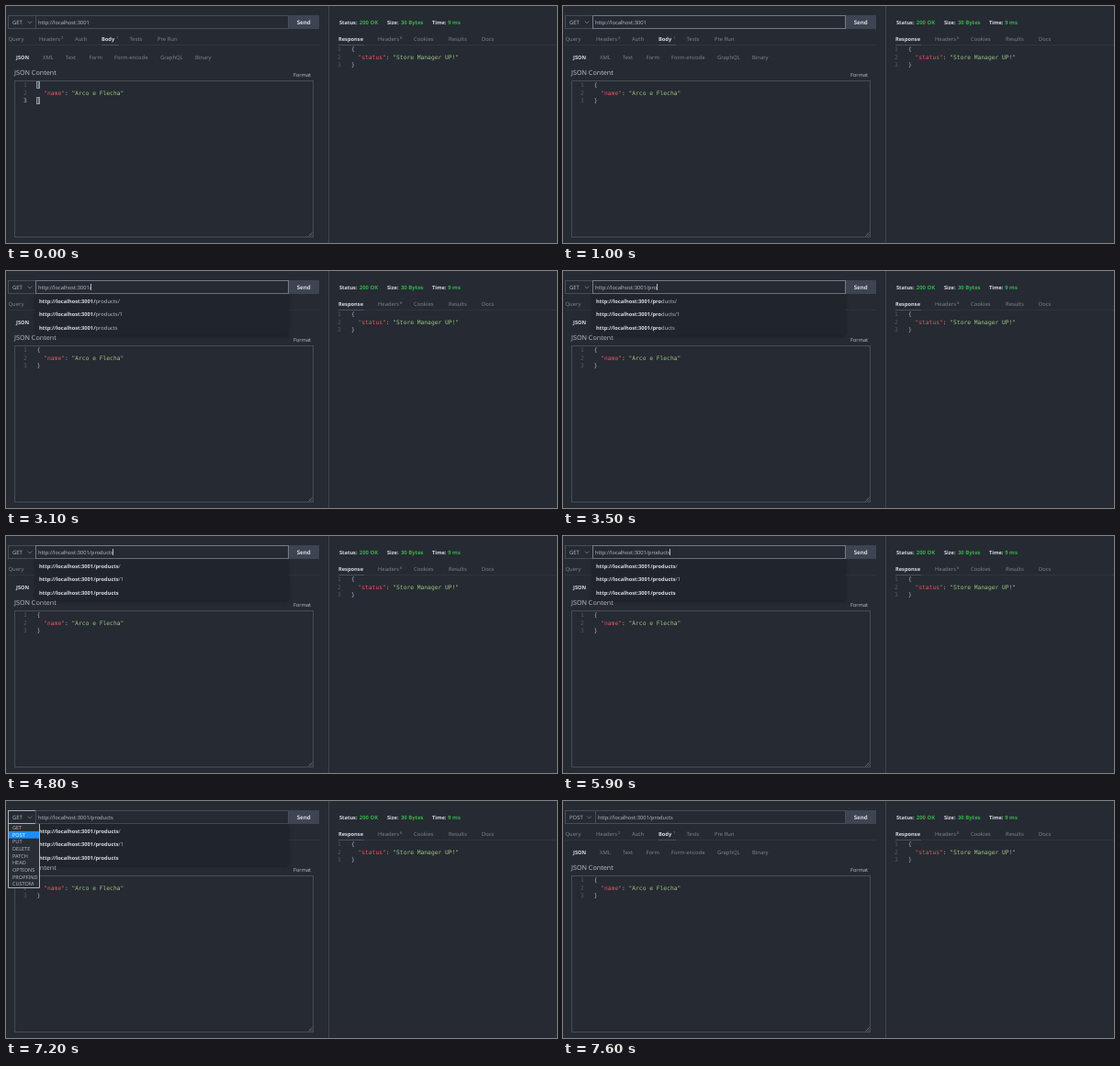
These frames come from a looping animation (600x258 px, 8 s). An HTML page with a canvas:

```html
<!DOCTYPE html>
<html lang="en">
<head>
<meta charset="utf-8">
<title>API client</title>
<style>
html, body { margin: 0; width: 100%; height: 100%; overflow: hidden; background: #262a33; }
canvas { display: block; width: 600px; height: 258px; }
</style>
</head>
<body>
<canvas id="stage"></canvas>
<script>
const W = 600, H = 258, LOOP = 8000;
const canvas = document.getElementById('stage');
const ctx = canvas.getContext('2d');
const ratio = window.devicePixelRatio || 1;
canvas.width = W * ratio;
canvas.height = H * ratio;

const SANS = '"Noto Sans", "Open Sans", sans-serif';
const MONO = '"DejaVu Sans Mono", monospace';
const C = {
  bg: '#262a33', line: '#3d434e', rule: '#2f343d', active: '#4a505a',
  border: '#464d58', focus: '#747b86', dim: '#7c828b', text: '#b4b8bf',
  bright: '#d6d9de', gutter: '#555b66', brace: '#a4b6c4', cursor: '#b4b8bf',
  key: '#e6565f', string: '#98c77f', green: '#35b24a', button: '#3d4452',
  hover: '#48505f', popup: '#20242b', select: '#1b8dfb'
};
const BASE = 'http://localhost:3001';
const METHODS = ['GET', 'POST', 'PUT', 'DELETE', 'PATCH', 'HEAD', 'OPTIONS', 'PROPFIND', 'CUSTOM'];

// Time at which each character of the path is typed.
const PATH = '/products';
const KEYS = [3100, 3300, 3400, 3500, 3800, 4000, 4200, 4400, 4800];
const FOCUS = 800, OPEN = 6400, PICK = 7200, DONE = 7600;

const within = (t, a, b) => t >= a && t < b;

function text(s, x, y, color, size = 5.8, bold = false, family = SANS) {
  ctx.font = `${bold ? 'bold ' : ''}${size}px ${family}`;
  ctx.fillStyle = color;
  ctx.fillText(s, x, y);
  return x + ctx.measureText(s).width;
}

function fill(x, y, w, h, color) {
  ctx.fillStyle = color;
  ctx.fillRect(x, y, w, h);
}

function frame(x, y, w, h, color) {
  ctx.strokeStyle = color;
  ctx.lineWidth = 1;
  ctx.strokeRect(x + .5, y + .5, w - 1, h - 1);
}

function path(color, width, ...points) {
  ctx.strokeStyle = color;
  ctx.lineWidth = width;
  ctx.beginPath();
  points.forEach(([x, y]) => ctx.lineTo(x, y));
  ctx.stroke();
}

function tabs(list, y, active) {
  for (const [label, x, count, countX] of list) {
    const on = label === active;
    text(label, x, y, on ? C.bright : C.dim, on ? 5.7 : 5.85, on);
    if (count) text(count, countX, y - 1.6, C.dim, 4.2);
  }
}

function code(x, y, key, value, active) {
  const mono = (s, px, py, color) => text(s, px, py, color, 6.29, false, MONO);
  for (let i = 0; i < 3; i++) {
    mono(i + 1, x - 14.8, y + i * 8.5, i === active ? C.text : C.gutter);
  }
  mono('{', x, y, C.brace);
  let end = mono(`"${key}"`, x + 7.57, y + 8.5, C.key);
  end = mono(': ', end, y + 8.5, C.text);
  mono(`"${value}"`, end, y + 8.5, C.string);
  mono('}', x, y + 17, C.brace);
}

function response() {
  fill(351, 0, 1, H, C.line);
  const status = [['Status:', 363, '200 OK', 384.8], ['Size:', 415, '30 Bytes', 430], ['Time:', 464, '9 ms', 481.2]];
  for (const [label, x, value, vx] of status) {
    text(label, x, 19.8, C.bright, 5.65, true);
    text(value, vx, 19.8, C.green, 5.9, true);
  }
  tabs([['Response', 362], ['Headers', 405, '6', 429], ['Cookies', 444], ['Results', 482], ['Docs', 518]], 37.9, 'Response');
  fill(362, 42, 238, 1, C.rule);
  fill(362, 42, 28, 1, C.active);
  code(375.9, 49.4, 'status', 'Store Manager UP!');
}

function request(editing) {
  tabs([['Query', 2.5], ['Headers', 36, '2', 60], ['Auth', 75], ['Body', 104, '1', 120], ['Tests', 134.5], ['Pre Run', 165]], 37.9, 'Body');
  fill(2, 42, 339, 1, C.rule);
  fill(104, 42, 19, 1, C.active);
  tabs([['JSON', 11], ['XML', 40], ['Text', 65], ['Form', 90.5], ['Form-encode', 118], ['GraphQL', 168], ['Binary', 206]], 57.5, 'JSON');
  text('JSON Content', 9, 75.1, C.text, 7.2);
  text('Format', 313, 77, C.text, 5.65);
  frame(9, 81, 326, 171, C.border);
  path(C.dim, .7, [329.5, 250.5], [333.5, 246.5]);
  path(C.dim, .7, [331.8, 250.5], [333.5, 248.8]);
  if (editing) {
    for (const y of [82, 99]) {
      fill(33, y, 4, 8, '#39434c');
      frame(33, y, 4, 8, '#8b959b');
    }
  }
  code(33.7, 88.3, 'name', 'Arco e Flecha', editing ? 2 : -1);
}

function chevron(x) {
  path(C.dim, .8, [x - 2.3, 16.6], [x, 18.9], [x + 2.3, 16.6]);
}

function urlBar(t, typed) {
  const posted = t >= DONE;
  const focused = within(t, FOCUS, OPEN);
  const left = posted ? 35 : 32;
  frame(2, 10, left - 1, 15, within(t, OPEN, DONE) ? '#aeb2b8' : C.border);
  text(posted ? 'POST' : 'GET', 7, 19.9, C.text, 5.9);
  chevron(posted ? 28.5 : 26);
  frame(left, 10, 308 - left, 15, focused ? C.focus : C.border);
  const end = text(BASE + typed, left + 3, 19.6, C.text, 5.73);
  if (within(t, 2200, 2800) || within(t, 3100, 5300) || within(t, 5900, OPEN)) {
    fill(Math.floor(end), 14, 1, 7, C.cursor);
  }
  fill(308, 10, 33, 15, within(t, 5000, 5300) ? C.hover : C.button);
  text('Send', 316.7, 20, C.bright, 6.2, true);
}

function suggestions(typed) {
  ctx.save();
  ctx.shadowColor = 'rgba(0,0,0,.35)';
  ctx.shadowBlur = 4 * ratio;
  ctx.shadowOffsetY = ratio;
  fill(32, 25, 275, 45, C.popup);
  ctx.restore();
  ['/products/', '/products/1', '/products'].forEach((s, i) => {
    const y = 34.9 + i * 14.4;
    const end = text(BASE + typed, 36, y, C.bright, 5.69, true);
    text(s.slice(typed.length), end, y, C.text, 5.8);
  });
}

function methodMenu(t) {
  const active = t < PICK ? 0 : 1;
  fill(2, 25, 35, 70, '#292d36');
  fill(3, 25.3 + active * 7.65, 33, 7.8, C.select);
  METHODS.forEach((m, i) => text(m, 7, 31.2 + i * 7.63, i === active ? '#fff' : C.text, 5.55));
  path('#aeb2b8', 1, [2.5, 25], [2.5, 94.5], [36.5, 94.5], [36.5, 25]);
}

function draw(t) {
  ctx.setTransform(ratio, 0, 0, ratio, 0, 0);
  ctx.textRendering = 'geometricPrecision';
  fill(0, 0, W, H, C.bg);
  const typed = PATH.slice(0, KEYS.filter(k => t >= k).length);
  response();
  request(t < FOCUS);
  urlBar(t, typed);
  if (within(t, KEYS[0], DONE)) suggestions(typed);
  if (within(t, OPEN, DONE)) methodMenu(t);
}

const start = performance.now();
function tick() {
  draw((performance.now() - start) % LOOP);
  requestAnimationFrame(tick);
}
tick();
</script>
</body>
</html>
```
